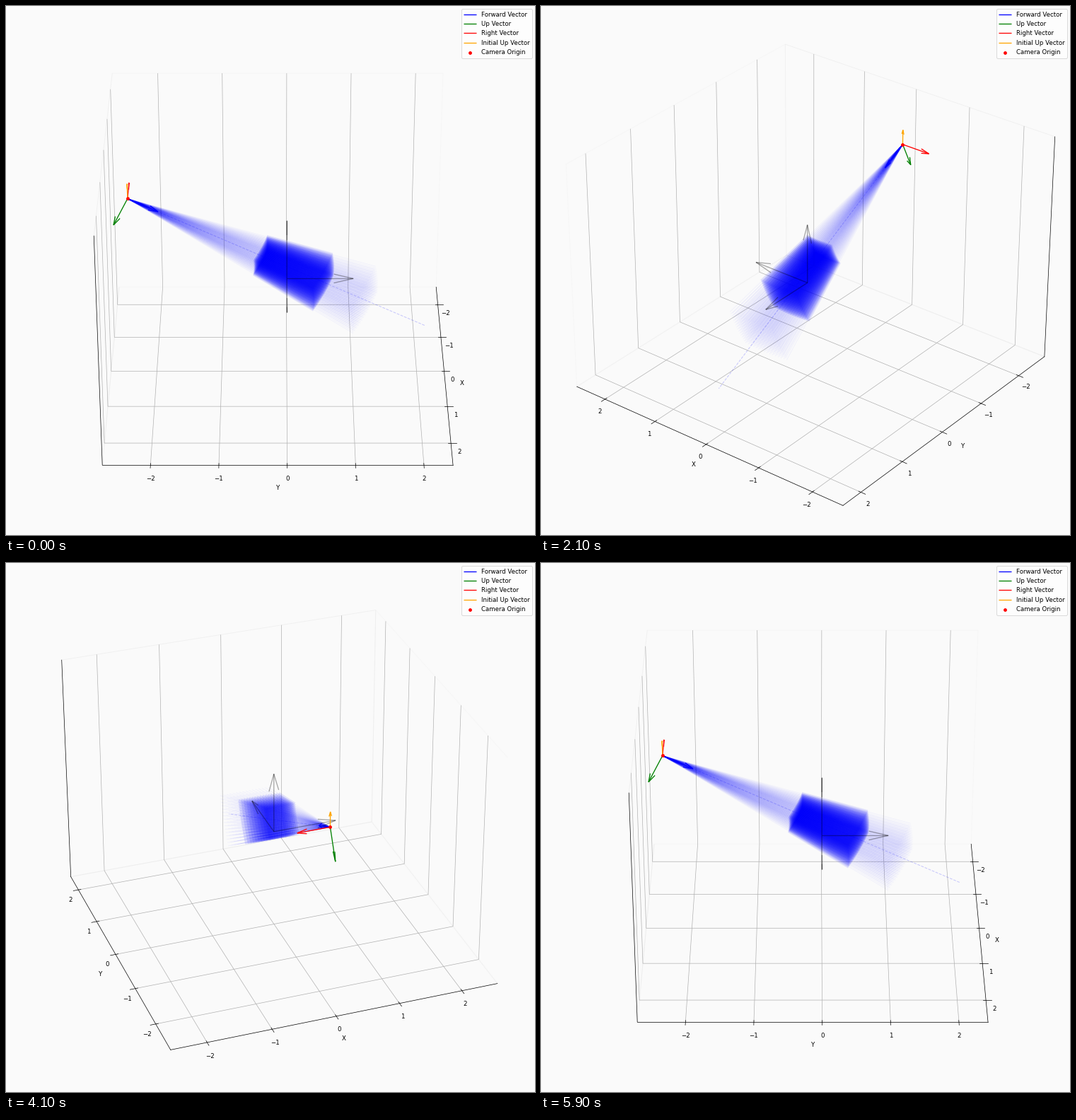
Write a matplotlib script that moves like this. It is 748 px wide and 748 px high and loops after 6000 ms.

```python
import numpy as np
import matplotlib.pyplot as plt
from matplotlib.animation import FuncAnimation
from mpl_toolkits.mplot3d.art3d import Line3DCollection

SIZE, DPI = 748, 62.5
FRAMES, INTERVAL = 60, 100
BACKGROUND = "#fafafa"

# Camera pose: position and orthonormal basis
EYE = np.array([0, -2.374, 1.376])
TILT = np.arctan2(2.194, 4.457)
FORWARD = np.array([0, np.cos(TILT), -np.sin(TILT)])
UP = np.array([0, -np.sin(TILT), -np.cos(TILT)])
RIGHT = np.array([-1.0, 0, 0])

RAYS_PER_SIDE = 16
HALF_FOV = 0.1  # tangent of the half angle
NEAR, FAR, RAY_END = 2.22, 3.29, 4.0


def ray_directions():
    steps = np.linspace(-HALF_FOV, HALF_FOV, RAYS_PER_SIDE)
    a, b = (g.reshape(-1, 1) for g in np.meshgrid(steps, steps))
    rays = FORWARD + a * RIGHT + b * UP
    return rays / np.linalg.norm(rays, axis=1, keepdims=True)


def add_segments(start, end, width, alpha, zorder):
    ends = np.stack([EYE + start * rays, EYE + end * rays], axis=1)
    ax.add_collection3d(Line3DCollection(
        ends, colors="blue", linewidths=width, alpha=alpha, zorder=zorder))


def add_arrow(origin, vector, color, **kwargs):
    return ax.quiver(*origin, *vector, color=color, linewidth=1.5,
                     arrow_length_ratio=0.3, **kwargs)


fig = plt.figure(figsize=(SIZE / DPI, SIZE / DPI), dpi=DPI, facecolor=BACKGROUND)
ax = fig.add_axes([0, 0, 1, 1], projection="3d", computed_zorder=False)
ax.set_facecolor(BACKGROUND)

rays = ray_directions()
add_segments(0, RAY_END, 1.0, 0.045, 2)
add_segments(NEAR, FAR, 5.5, 0.1, 3)

path = np.stack([EYE, EYE + 5 * FORWARD])
ax.plot(*path.T, "--", color="blue", alpha=0.2, linewidth=1.2, zorder=4)

for axis in np.eye(3):
    add_arrow((0, 0, 0), axis, "black", alpha=0.33, zorder=5)

handles = [
    add_arrow(EYE, 0.5 * FORWARD, "blue", label="Forward Vector", zorder=6),
    add_arrow(EYE, 0.5 * UP, "green", label="Up Vector", zorder=6),
    add_arrow(EYE, 0.5 * RIGHT, "red", label="Right Vector", zorder=6),
    add_arrow(EYE, (0, 0, 0.25), "orange", label="Initial Up Vector", zorder=6),
    ax.scatter(*EYE, color="red", s=20, depthshade=False,
               label="Camera Origin", zorder=7),
]
ax.legend(handles=handles, loc="upper right")

# Same data scale on all axes for the 4:4:3 box
ax.set_xlim(0.01 - 2.565, 0.01 + 2.565)
ax.set_ylim(-0.14 - 2.565, -0.14 + 2.565)
ax.set_zlim(0.271 - 1.924, 0.271 + 1.924)
ax.set_xticks(range(-2, 3))
ax.set_yticks(range(-2, 3))
ax.set_zticks([])
ax.set_xlabel("X")
ax.set_ylabel("Y")
for axis in (ax.xaxis, ax.yaxis, ax.zaxis):
    axis.pane.fill = False


def update(i):
    ax.view_init(elev=30, azim=360 * i / (FRAMES - 1))
    return []


anim = FuncAnimation(fig, update, frames=FRAMES, interval=INTERVAL,
                     init_func=lambda: update(0), repeat=True, repeat_delay=0)
plt.show()
```
